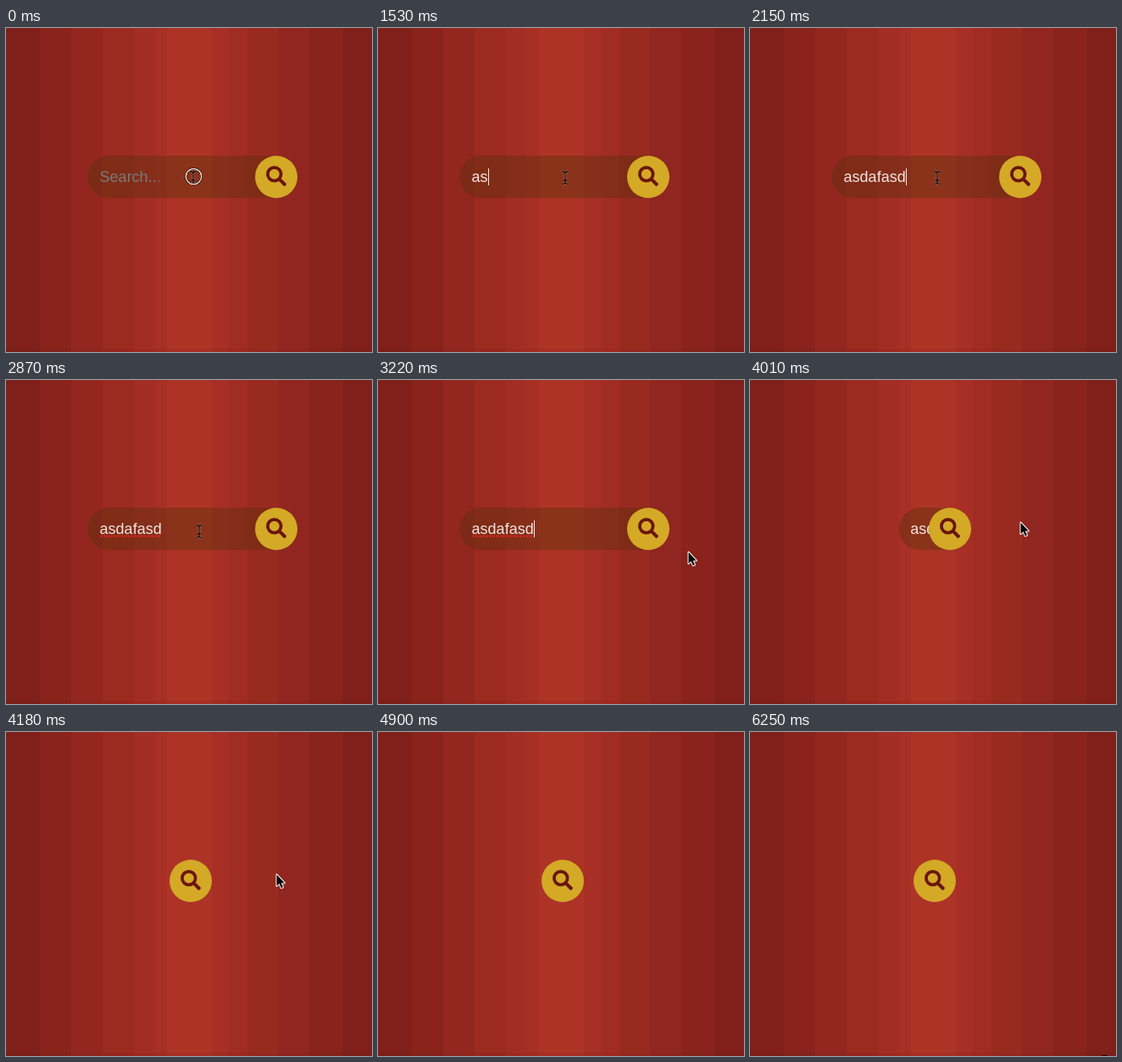
Animation of 432x383 px, one loop 6.33 s. Source, as an HTML page with a canvas:

```html
<!DOCTYPE html>
<html lang="en">
<head>
<meta charset="utf-8">
<title>Search box</title>
<style>
html, body { margin: 0; width: 100%; height: 100%; overflow: hidden; background: #80201a; }
canvas { display: block; }
</style>
</head>
<body>
<canvas id="stage" width="432" height="383"></canvas>
<script>
const W = 432, H = 383, LOOP = 6330;
const ctx = document.getElementById('stage').getContext('2d');

const BANDS = [
  [0, '#80201a'], [40, '#89231c'], [77, '#932720'], [114, '#9b2a20'],
  [151, '#a22d23'], [176, '#a82f24'], [190, '#ad3326'], [243, '#a72f25'],
  [263, '#a12c22'], [285, '#992a20'], [321, '#912620'], [358, '#89231b'],
  [397, '#80201a']
];
const WORD = 'asdafasd';
// [time, letters typed]
const TYPING = [[0, 0], [1530, 2], [1700, 3], [1880, 4], [1970, 5], [2060, 6], [2150, 8]];
// [time, caret visible]
const CARET = [[0, 0], [540, 1], [990, 0], [1530, 1], [2690, 0], [3220, 1], [3750, 0]];
// [time, shape, x, y]
const POINTER = [
  [0, 'beam', 221, 177], [2870, 'beam', 228, 179], [2960, 'beam', 254, 184],
  [3050, 'hand', 304, 191], [3140, 'arrow', 351, 200], [3220, 'arrow', 366, 203],
  [3300, 'arrow', 358, 196], [3390, 'hand', 339, 182], [3480, 'hand', 324, 172],
  [3570, 'hand', 322, 171], [3660, 'hand', 320, 171], [3750, 'hand', 318, 170],
  [3920, 'arrow', 319, 168], [4810, 'arrow', 346, 169], [4900, 'none', 0, 0],
  [6250, 'tip', 418.5, 382]
];
const FOLD_STEPS = [[0], [3920], [4010], [4090], [4180]];
const FOLD_START = 3854, FOLD_TIME = 300;

const at = (list, t) => list.findLast(k => k[0] <= t);
const mix = (a, b, p) => a + (b - a) * p;
const bez = (a, b, u) => 3 * a * u * (1 - u) ** 2 + 3 * b * u * u * (1 - u) + u ** 3;

// cubic-bezier(.25, .1, .25, 1)
function ease(x) {
  if (x <= 0) return 0;
  if (x >= 1) return 1;
  let lo = 0, hi = 1;
  for (let i = 0; i < 24; i++) {
    const mid = (lo + hi) / 2;
    if (bez(0.25, 0.25, mid) < x) lo = mid; else hi = mid;
  }
  return bez(0.1, 1, lo);
}

function circle(x, y, r) {
  ctx.beginPath();
  ctx.arc(x, y, r, 0, Math.PI * 2);
}

function background() {
  BANDS.forEach(([x, color]) => {
    ctx.fillStyle = color;
    ctx.fillRect(x, 0, W - x, H);
  });
  ctx.fillStyle = 'rgba(60,0,0,.06)';
  ctx.fillRect(0, 379, W, 4);
}

function lens(cx, cy) {
  ctx.save();
  ctx.translate(cx - 12, cy - 12);
  ctx.scale(24 / 512, 24 / 512);
  ctx.strokeStyle = ctx.fillStyle = '#6a150f';
  ctx.lineWidth = 80;
  circle(208, 208, 168);
  ctx.stroke();
  ctx.rotate(Math.PI / 4);
  ctx.beginPath();
  ctx.roundRect(484, -44, 210, 88, 24);
  ctx.fill();
  ctx.restore();
}

function label(t, x) {
  const typed = WORD.slice(0, at(TYPING, t)[1]);
  ctx.font = '18px "Liberation Sans", Arial, sans-serif';
  ctx.textBaseline = 'alphabetic';
  ctx.fillStyle = typed ? '#f0e5e3' : '#777a7a';
  ctx.fillText(typed || 'Search...', x, 182);
  if (t >= 2870 && t < 3750) {
    ctx.fillStyle = '#e0261c';
    for (let dx = 2; dx < 73; dx += 4) {
      circle(x + dx, 184.6, 1.3);
      ctx.fill();
    }
  }
  if (at(CARET, t)[1]) {
    ctx.fillStyle = '#f4ecea';
    ctx.fillRect(Math.round(x + ctx.measureText(typed).width), 166, 1, 20);
  }
}

function searchBox(t) {
  const p = ease((at(FOLD_STEPS, t)[0] - FOLD_START) / FOLD_TIME);
  const left = mix(96, 193, p), right = mix(344, 243, p);
  if (p < 1) {
    ctx.fillStyle = 'rgba(89,48,10,.4)';
    ctx.beginPath();
    ctx.roundRect(left, 151, right - left, 50, 25);
    ctx.fill();
    ctx.save();
    ctx.beginPath();
    ctx.rect(left, 151, Math.max(0, right - 48 - left), 50);
    ctx.clip();
    label(t, left + mix(14.6, 13.4, p));
    ctx.restore();
  }
  ctx.fillStyle = '#d4a926';
  circle(right - 25, 176, 25);
  ctx.fill();
  lens(right - 25, 175);
}

function ring(x, y) {
  [[9.2, 2.6, '#1c0b08'], [9.2, 1.3, '#fff4e6']].forEach(([r, width, color]) => {
    ctx.lineWidth = width;
    ctx.strokeStyle = color;
    circle(x, y, r);
    ctx.stroke();
  });
}

function outlined(d, line, fill, width) {
  const path = new Path2D(d);
  ctx.lineJoin = 'round';
  ctx.strokeStyle = line;
  ctx.lineWidth = width;
  ctx.stroke(path);
  ctx.fillStyle = fill;
  ctx.fill(path);
}

const SHAPES = {
  beam() {
    const path = new Path2D('M-3.5 -7.5Q-.5 -7.5 0 -5.5Q.5 -7.5 3.5 -7.5M0 -6V6M-3.5 7.5Q-.5 7.5 0 5.5Q.5 7.5 3.5 7.5M-2 3H2');
    [[2.6, 'rgba(240,205,195,.5)'], [1.3, '#140806']].forEach(([width, color]) => {
      ctx.lineWidth = width;
      ctx.strokeStyle = color;
      ctx.stroke(path);
    });
  },
  arrow() {
    outlined('M.5 .5V14L3.6 11.2L5.8 16.4L8 15.5L5.8 10.4H9.8Z', '#fff', '#080808', 2);
  },
  hand() {
    outlined('M-1.6 1Q-.2 -.8 1.3 .8L2.6 6Q3.9 4.6 5 6.4Q6.6 5.4 7.4 7.3Q9.4 7 9.2 9.3L8.6 13L7.6 16.5H-.3L-4 11.5Q-5.4 9.2 -3.4 8.8L-.4 10.6Z',
      '#000', '#fff', 1.8);
    ctx.strokeStyle = '#000';
    ctx.lineWidth = 0.8;
    ctx.stroke(new Path2D('M1.6 11V14.5M3.7 11V14.5M5.8 11V14.5'));
  },
  tip() {
    ctx.fillStyle = 'rgba(0,0,0,.35)';
    ctx.fillRect(-4, 0, 8, 1);
    ctx.fillStyle = '#000';
    ctx.fillRect(-2.5, 0, 5, 1);
  },
  none() {}
};

function pointer(t) {
  const [, shape, x, y] = at(POINTER, t);
  ctx.save();
  ctx.translate(x, y);
  SHAPES[shape]();
  ctx.restore();
  if (t < 90) ring(221.5, 175.5);
  if (t >= 3750 && t < 3920) ring(320.5, 168.5);
}

function draw(now) {
  const t = Math.max(0, now) % LOOP;
  background();
  searchBox(t);
  pointer(t);
}

let start;
function frame(now) {
  start ??= now;
  draw(now - start);
  requestAnimationFrame(frame);
}
draw(0);
requestAnimationFrame(frame);
</script>
</body>
</html>
```
